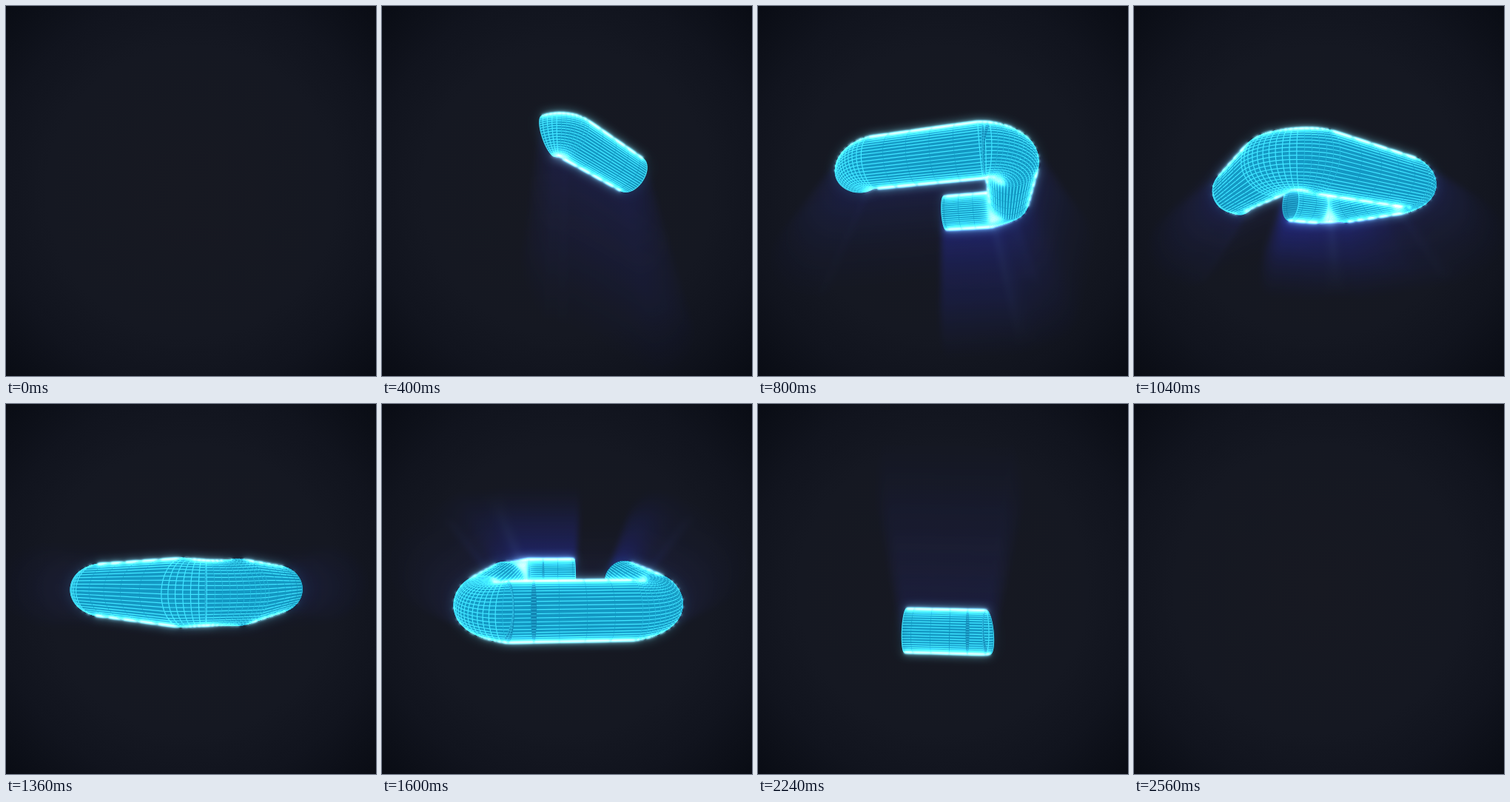
An HTML page with a canvas for the animation above (2.64 s loop, 500 by 500 pixels).

```html
<!DOCTYPE html>
<html lang="en">
<head>
<meta charset="utf-8">
<title>Neon tube loop</title>
<style>
html, body { margin: 0; width: 100%; height: 100%; overflow: hidden; background: #12151f; }
canvas { display: block; width: 100vw; height: 100vh; }
</style>
</head>
<body>
<canvas id="stage" width="500" height="500"></canvas>
<script>
const SIZE = 500, LOOP = 2640, STEP = 80, MID = 1320;
const HALF = 3.15, BEND = 1.1, RADIUS = 1, PINCH = 0.09;   // rounded square and its tube
const CAMERA = 11, FOCAL = 336;
const SIDES = 52, RINGS = 16, ARC = BEND / (2 * HALF);
const START = -1.06, END = 2.85;              // trail limits, one unit per side
const { sin, cos, atan, PI, exp, min, max, round, abs } = Math;
const rad = PI / 180;

const ctx = document.getElementById('stage').getContext('2d');
const layer = () => {
  const c = document.createElement('canvas');
  c.width = c.height = SIZE;
  return c.getContext('2d');
};
const tube = layer(), edge = layer(), hot = layer();
let rays = layer(), spare = layer();

const clamp = v => min(1, max(0, v));
const ease = v => (1 - cos(PI * clamp(v))) / 2;

// The camera travels straight down past the loop while aiming at its centre.
function pose(t) {
  const d = t - MID;
  return {
    spin: (-72 - 360 * d / LOOP - 36 * sin(2 * PI * d / LOOP)) * rad,
    tilt: atan(0.00086 * (d - 8)),
    lightY: 250 + 0.44 * (d - 10),
    head: START + (END - START) * ease(t / 1300),
    tail: START + (END - START) * ease((t - MID) / 1240)
  };
}

// Centre point, outward normal and tube radius at s; whole numbers are corners.
function pathAt(s, spin) {
  const k = round(s), f = s - k, a = spin + k * PI / 2;
  const ox = sin(a), oz = cos(a), tx = cos(a), tz = -sin(a);
  const turn = max(-1, min(1, f / ARC)) * PI / 4;
  const nx = ox * cos(turn) + tx * sin(turn);
  const nz = oz * cos(turn) + tz * sin(turn);
  const inset = (HALF - BEND) * Math.SQRT2;
  const run = max(0, abs(f) - ARC) * 2 * HALF / Math.SQRT2;
  const dir = Math.sign(f);
  return {
    x: ox * inset + nx * BEND + (dir * tx - ox) * run,
    z: oz * inset + nz * BEND + (dir * tz - oz) * run,
    nx, nz,
    radius: RADIUS * (1 - PINCH * cos(2 * turn))
  };
}

function sampleStops(tail, head) {
  const stops = [{ s: tail, ring: true }, { s: head, ring: true }];
  const add = (s, ring) => { if (s > tail && s < head) stops.push({ s, ring }); };
  for (let k = -2; k <= 3; k++) {
    for (let i = 0; i <= RINGS; i++) add(k - ARC + 2 * ARC * i / RINGS, true);
    for (let i = 1; i < 5; i++) add(k + ARC + (1 - 2 * ARC) * i / 5, false);
  }
  return stops.sort((a, b) => a.s - b.s);
}

function buildRings(p) {
  const st = sin(p.tilt), ct = cos(p.tilt), distance = CAMERA / ct;
  return sampleStops(p.tail, p.head).map(({ s, ring }) => {
    const c = pathAt(s, p.spin), points = [];
    for (let j = 0; j <= SIDES; j++) {
      const b = 2 * PI * j / SIDES, out = c.radius * cos(b), y = c.radius * sin(b);
      const x = c.x + c.nx * out, z = c.z + c.nz * out;
      const scale = FOCAL / (distance - (z * ct - y * st));
      points.push([250 + x * scale, 250 + (z * st + y * ct) * scale]);
    }
    return { s, ring, points, depth: c.z * ct };
  });
}

function polygon(path, pts) {
  pts.forEach((p, i) => i ? path.lineTo(p[0], p[1]) : path.moveTo(p[0], p[1]));
  path.closePath();
}

function line(path, a, b) {
  path.moveTo(a[0], a[1]);
  path.lineTo(b[0], b[1]);
}

function buildSection(r, q, last) {
  const part = { depth: (r.depth + q.depth) / 2 };
  for (const name of ['front', 'back', 'frontLines', 'backLines', 'outline', 'inner']) {
    part[name] = new Path2D();
  }
  const mid = (r.s + q.s) / 2, inBend = abs(mid - round(mid)) < ARC;
  const quads = [], facing = [];
  for (let j = 0; j < SIDES; j++) {
    const a = r.points[j], b = q.points[j], c = q.points[j + 1], d = r.points[j + 1];
    quads.push([a, b, c, d]);
    facing.push((c[0] - a[0]) * (d[1] - b[1]) - (c[1] - a[1]) * (d[0] - b[0]) > 0);
  }
  // The widest side always turns outward to the viewer, whichever way it winds.
  quads.forEach(([a, b, c, d], j) => {
    const near = facing[j];
    polygon(near ? part.front : part.back, near ? [a, b, c, d] : [d, c, b, a]);
    const lines = near ? part.frontLines : part.backLines;
    line(lines, a, b);
    if (r.ring) line(lines, a, d);
    if (last) line(lines, b, c);
    if (near !== facing[(j + SIDES - 1) % SIDES]) line(part.outline, a, b);
    if (inBend && near && cos(2 * PI * (j + 0.5) / SIDES) < -0.35) {
      polygon(part.inner, [a, b, c, d]);
    }
  });
  return part;
}

function paint(target, path, color) {
  target.fillStyle = target.strokeStyle = color;
  target.lineWidth = 0.8;
  target.fill(path);
  target.stroke(path);
}

function strokeLines(target, path, color, width) {
  target.strokeStyle = color;
  target.lineWidth = width;
  target.stroke(path);
}

function drawTube(rings, tilt) {
  const parts = rings.slice(1).map((q, i) => buildSection(rings[i], q, i === rings.length - 2));
  parts.sort((a, b) => a.depth - b.depth);
  const floor = 0.7 * abs(sin(tilt));
  for (const part of parts) {
    paint(tube, part.back, 'rgb(14,110,150)');
    strokeLines(tube, part.backLines, 'rgba(70,215,240,.5)', 1);
    paint(tube, part.front, 'rgb(16,128,166)');
    strokeLines(tube, part.frontLines, 'rgba(72,226,246,.8)', 1.2);

    const glow = floor + (1 - floor) * clamp((2.2 - part.depth) / 3.5);
    const emission = `rgb(${18 * glow},${22 * glow},${190 * glow})`;
    paint(rays, part.back, emission);
    paint(rays, part.front, emission);
    paint(rays, part.inner, 'rgb(60,90,255)');

    paint(hot, part.back, '#000');
    paint(hot, part.front, '#000');
    paint(hot, part.inner, 'rgb(170,230,240)');

    edge.globalCompositeOperation = 'destination-out';
    paint(edge, part.back, '#000');
    paint(edge, part.front, '#000');
    edge.globalCompositeOperation = 'source-over';
    strokeLines(edge, part.outline, '#8cf6ff', 2.6);
  }
}

// Smear the emission away from the light, doubling the sample count each pass.
function spreadRays(lightY) {
  for (let i = 0; i < 6; i++) {
    const n = 2 ** i, zoom = exp(0.0075 * n);
    spare.globalCompositeOperation = 'lighter';
    spare.clearRect(0, 0, SIZE, SIZE);
    spare.globalAlpha = 0.53;
    spare.drawImage(rays.canvas, 0, 0);
    spare.globalAlpha = 0.5 * exp(-0.02 * n);
    spare.setTransform(zoom, 0, 0, zoom, 252 * (1 - zoom), lightY * (1 - zoom));
    spare.drawImage(rays.canvas, 0, 0);
    spare.resetTransform();
    [rays, spare] = [spare, rays];
  }
}

function addLayer(source, blur, alpha, mode = 'lighter') {
  ctx.globalCompositeOperation = mode;
  ctx.filter = blur ? `blur(${blur}px)` : 'none';
  ctx.globalAlpha = alpha;
  ctx.drawImage(source.canvas, 0, 0);
}

function drawBackground() {
  const g = ctx.createRadialGradient(250, 250, 0, 250, 250, 355);
  g.addColorStop(0, '#171922');
  g.addColorStop(0.55, '#151822');
  g.addColorStop(0.75, '#11141e');
  g.addColorStop(1, '#090c14');
  ctx.fillStyle = g;
  ctx.fillRect(0, 0, SIZE, SIZE);
}

function render(t) {
  drawBackground();
  const p = pose(t);
  if (p.head - p.tail < 0.005) return;
  for (const l of [tube, edge, hot, rays]) {
    l.globalAlpha = 1;
    l.globalCompositeOperation = 'source-over';
    l.clearRect(0, 0, SIZE, SIZE);
  }
  drawTube(buildRings(p), p.tilt);
  spreadRays(p.lightY);

  ctx.save();
  addLayer(rays, 3, 0.85);
  addLayer(tube, 0, 1, 'source-over');
  addLayer(tube, 8, 0.16);
  addLayer(edge, 6, 0.9);
  addLayer(edge, 2.5, 0.8);
  addLayer(edge, 0.8, 1);
  addLayer(hot, 7, 0.8);
  addLayer(hot, 2, 0.7);
  ctx.restore();
}

let shown = -1;
const began = performance.now();
function tick() {
  const t = Math.floor(((performance.now() - began) % LOOP) / STEP) * STEP;
  if (t !== shown) render(shown = t);
  requestAnimationFrame(tick);
}
tick();
</script>
</body>
</html>
```
